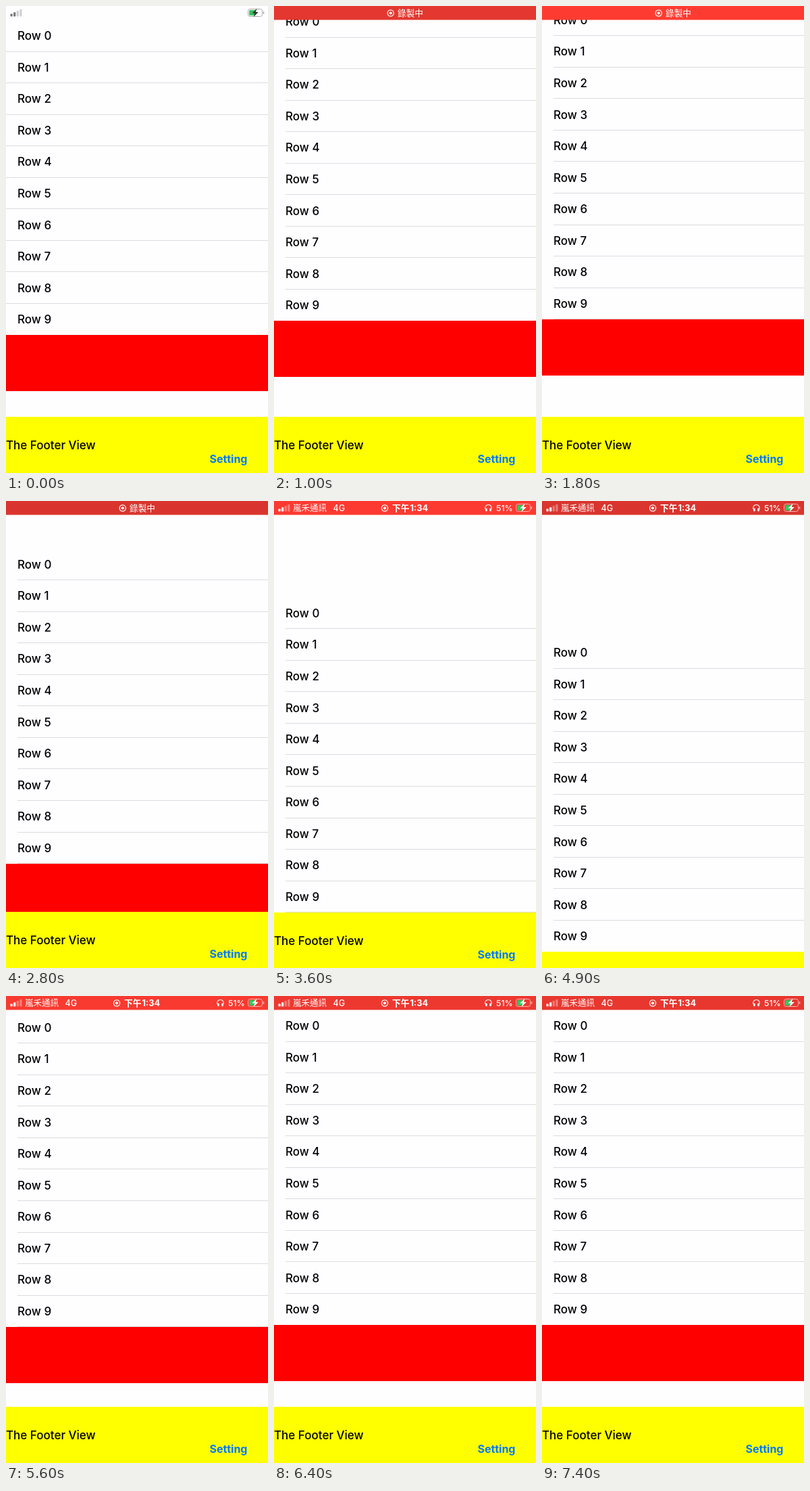
These frames come from a looping animation (388 by 690 pixels, 7.5 s). An HTML page with a canvas:

```html
<!DOCTYPE html>
<html lang="zh-Hant">
<head>
<meta charset="utf-8">
<title>Sticky footer</title>
<style>
html, body { margin: 0; width: 100%; height: 100%; overflow: hidden; background: #fefdff; }
canvas { display: block; width: 388px; height: 690px; }
</style>
</head>
<body>
<canvas id="stage" width="388" height="690"></canvas>
<script>
const ctx = document.getElementById('stage').getContext('2d');
const W = 388, H = 690, LOOP = 7500, STEP = 100;
const ROW = 46.55, TOP = 20.5, FOOTER = 83, BAR = 20.5;
const SANS = 'Inter, "Noto Sans CJK TC", "Noto Sans CJK", sans-serif';

// Drag of the list: time in ms, offset in px
const drag = [[0, 0], [700, 0], [1300, -42], [1800, -23.3], [2800, 49.6],
  [3600, 121.7], [4300, 168], [4900, 180]];
const RELEASE = 4950, SPRING = 0.0095;

const rate = i => (drag[i + 1][1] - drag[i][1]) / (drag[i + 1][0] - drag[i][0]);

// Harmonic mean keeps the curve from overshooting its points
function slope(i) {
  if (i === 0 || i === drag.length - 1) return 0;
  const a = rate(i - 1), b = rate(i);
  return a * b > 0 ? 2 * a * b / (a + b) : 0;
}

function offsetAt(t) {
  const last = drag[drag.length - 1];
  if (t >= RELEASE) {
    const s = (t - RELEASE) * SPRING;
    return last[1] * (1 + s) * Math.exp(-s);
  }
  if (t >= last[0]) return last[1];
  const i = drag.findIndex(k => k[0] > t) - 1;
  const [t0, y0] = drag[i], [t1, y1] = drag[i + 1];
  const d = t1 - t0, u = (t - t0) / d, v = 1 - u;
  return v * v * ((1 + 2 * u) * y0 + u * d * slope(i)) +
    u * u * ((3 - 2 * u) * y1 - v * d * slope(i + 1));
}

function rect(color, x, y, w, h) {
  ctx.fillStyle = color;
  ctx.fillRect(x, y, w, h);
}

function text(str, x, y, size, weight, color) {
  ctx.font = `${weight} ${size}px ${SANS}`;
  ctx.fillStyle = color;
  ctx.fillText(str, x, y);
}

function shape(points, color) {
  ctx.beginPath();
  points.forEach(([x, y]) => ctx.lineTo(x, y));
  ctx.closePath();
  ctx.fillStyle = color;
  ctx.fill();
}

function box(x, y, w, h, r) {
  ctx.beginPath();
  ctx.roundRect(x, y, w, h, r);
}

function signal(color) {
  for (let i = 0; i < 4; i++) {
    const h = 4 + i * 2.2;
    ctx.globalAlpha = i < 2 ? 1 : 0.35;
    ctx.fillStyle = color;
    box(6.5 + i * 4.6, 15.5 - h, 3.2, h, 0.8);
    ctx.fill();
  }
  ctx.globalAlpha = 1;
}

function battery(line, bolt) {
  ctx.strokeStyle = ctx.fillStyle = line;
  ctx.lineWidth = 1;
  box(358.5, 4.5, 21, 11, 3);
  ctx.stroke();
  box(380.7, 8, 1.5, 4, 0.7);
  ctx.fill();
  ctx.fillStyle = '#35c759';
  box(360, 6, 9.5, 8, 1.5);
  ctx.fill();
  shape([[371.5, 3.8], [364.3, 10.8], [368.4, 10.8], [366.4, 16.3], [373.8, 9], [369.7, 9]], bolt);
}

function recordIcon(x) {
  ctx.strokeStyle = ctx.fillStyle = '#fff';
  ctx.lineWidth = 1.3;
  ctx.beginPath();
  ctx.arc(x, 10.5, 4.6, 0, 7);
  ctx.stroke();
  ctx.beginPath();
  ctx.arc(x, 10.5, 2.1, 0, 7);
  ctx.fill();
}

function headphones() {
  ctx.strokeStyle = ctx.fillStyle = '#fff';
  ctx.lineWidth = 1.2;
  ctx.beginPath();
  ctx.arc(317.5, 10.2, 4.7, Math.PI * 0.85, Math.PI * 2.15);
  ctx.stroke();
  box(313.2, 10.7, 2.5, 4.6, 1);
  ctx.fill();
  box(319.3, 10.7, 2.5, 4.6, 1);
  ctx.fill();
}

function statusBar(t) {
  if (t < STEP) {
    signal('#777');
    battery('#aaa', '#333');
    return;
  }
  const glow = (1 - Math.cos((t - 2750) / 2100 * 2 * Math.PI)) / 2;
  rect(`rgb(${217 + 38 * glow}, ${53 + 6 * glow}, ${46 + 3 * glow})`, 0, 0, W, BAR);
  if (t < 3100) {
    recordIcon(172.7);
    text('錄製中', 183, 15.2, 12.7, 500, '#fff');
    return;
  }
  signal('#fff');
  text('嵐禾通訊', 28, 15, 12.5, 500, '#fff');
  text('4G', 87.5, 15, 12.5, 500, '#fff');
  recordIcon(164);
  text('下午', 175, 15, 12.8, 600, '#fff');
  text('1:34', 201.5, 15, 12.8, 700, '#fff');
  headphones();
  text('51%', 329, 15, 12.3, 500, '#fff');
  battery('#f7b5b1', '#fff');
}

function draw(t) {
  const y = TOP + offsetAt(t), end = Math.round(y + 10 * ROW);
  rect('#fefdff', 0, 0, W, H);
  for (let i = 0; i < 10; i++) {
    text('Row ' + i, 17, y + i * ROW + 29.7, 17, 500, '#000');
    const inset = t < STEP ? 0 : 17;
    rect('#dcdbde', inset, Math.round(y + (i + 1) * ROW - 0.5), W - inset, 1);
  }
  rect('#f00', 0, end, W, FOOTER);

  // The footer stays at the bottom until the list pushes it down
  const foot = Math.max(H - FOOTER, end);
  rect('#ff0', 0, foot, W, H);
  text('The Footer View', 0, foot + 48, 17, 500, '#000');
  text('Setting', 301.5, foot + 68.3, 16, 700, '#007aff');
  statusBar(t);
}

function frame() {
  draw(Math.floor(performance.now() % LOOP / STEP) * STEP);
  requestAnimationFrame(frame);
}
frame();
</script>
</body>
</html>
```
